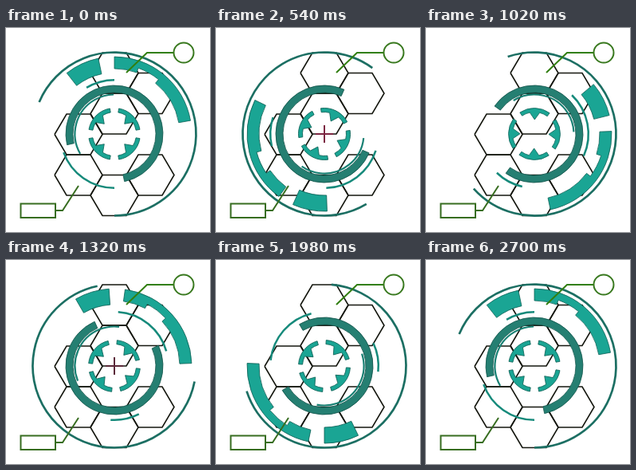
An HTML page with a canvas for the animation above (2760 ms loop, 256 px wide and 256 px high).

```html
<!DOCTYPE html>
<html lang="en">
<head>
<meta charset="utf-8">
<title>Rotating HUD</title>
<style>
  html, body { margin: 0; width: 100%; height: 100%; overflow: hidden; background: #fff; }
  canvas { display: block; width: 256px; height: 256px; }
</style>
</head>
<body>
<canvas id="stage" width="256" height="256"></canvas>
<script>
const ctx = document.getElementById('stage').getContext('2d');
const LOOP = 2760, STEP = 60;
const CX = 136, CY = 133;
const TEAL = '#1aa594', TEAL_EDGE = '#0f6257';
const STEEL = '#257f72', STEEL_EDGE = '#14564c';
const rad = deg => deg * Math.PI / 180;

function strokePath(points, color, width) {
  ctx.beginPath();
  points.forEach(([x, y]) => ctx.lineTo(x, y));
  ctx.strokeStyle = color;
  ctx.lineWidth = width;
  ctx.stroke();
}

function thinArc(r, from, to, color, width) {
  ctx.beginPath();
  ctx.arc(0, 0, r, rad(from), rad(to));
  ctx.strokeStyle = color;
  ctx.lineWidth = width;
  ctx.stroke();
}

function fillEdged(fill, edge) {
  ctx.closePath();
  ctx.fillStyle = fill;
  ctx.fill();
  ctx.strokeStyle = edge;
  ctx.lineWidth = 0.8;
  ctx.stroke();
}

function band(inner, outer, from, to, fill, edge) {
  ctx.beginPath();
  ctx.arc(0, 0, outer, rad(from), rad(to));
  ctx.arc(0, 0, inner, rad(to), rad(from), true);
  fillEdged(fill, edge);
}

function spin(deg, draw) {
  ctx.save();
  ctx.translate(CX, CY);
  ctx.rotate(rad(deg));
  draw();
  ctx.restore();
}

function drawHexagons() {
  const centers = [[136, 56.5], [181, 82], [136, 107.5], [91, 133.5], [91, 184.5], [136, 210], [181, 184.5]];
  for (const [x, y] of centers) {
    const corners = [[-30, 0], [-15, -25.5], [15, -25.5], [30, 0], [15, 25.5], [-15, 25.5], [-30, 0]];
    strokePath(corners.map(([dx, dy]) => [x + dx, y + dy]), '#15170f', 1.6);
  }
}

function drawFastRings() {
  thinArc(102.5, 203, 450, '#1c6f63', 2.7);
  band(52, 61, 167, 438, STEEL, STEEL_EDGE);
}

function drawBlocks() {
  band(77, 97, 232, 258, TEAL, TEAL_EDGE);
  // Long block with a notch cut into its inner side
  ctx.beginPath();
  ctx.arc(0, 0, 97, rad(270), rad(350));
  ctx.arc(0, 0, 82, rad(350), rad(309), true);
  ctx.arc(0, 0, 88, rad(309), rad(290), true);
  ctx.arc(0, 0, 82, rad(290), rad(270), true);
  fillEdged(TEAL, TEAL_EDGE);
  thinArc(49.5, 150, 269, '#178073', 2.2);
}

function drawSlowArcs() {
  thinArc(67.8, 239, 270, '#168a7b', 2.5);
  thinArc(67.8, 90, 160, '#168a7b', 2.5);
}

function drawReticle() {
  for (let i = 0; i < 4; i++) {
    ctx.beginPath();
    ctx.arc(0, 0, 32.5, rad(-35), rad(35));
    ctx.arc(0, 0, 27.5, rad(35), rad(13), true);
    ctx.lineTo(18, 0);
    ctx.arc(0, 0, 27.5, rad(-13), rad(-35), true);
    fillEdged(TEAL, TEAL_EDGE);
    ctx.rotate(Math.PI / 2);
  }
}

function drawCross(phase) {
  if (phase < 7 || phase > 14) return;
  const glow = Math.min(1, (phase - 6) / 4);
  const color = `rgb(${75 + 65 * glow}, ${42 - 6 * glow}, ${52 + 18 * glow})`;
  strokePath([[125, 133], [147, 133]], color, 2);
  strokePath([[136, 122], [136, 144]], color, 2);
}

function drawCallouts() {
  strokePath([[151, 56], [177, 31], [210, 31]], '#327f10', 2);
  ctx.beginPath();
  ctx.arc(223, 31, 12.5, 0, Math.PI * 2);
  ctx.strokeStyle = '#39791f';
  ctx.lineWidth = 2;
  ctx.stroke();
  ctx.strokeStyle = '#376d20';
  ctx.strokeRect(18.5, 220.5, 43.5, 17.5);
  strokePath([[62, 229], [71, 229], [91, 198]], '#376d20', 2);
}

function render() {
  const tick = Math.floor((performance.now() - start) % LOOP / STEP);
  ctx.fillStyle = '#fff';
  ctx.fillRect(0, 0, 256, 256);
  drawHexagons();
  spin(24 * tick, drawFastRings);
  spin(-16 * tick, drawBlocks);
  spin(-8 * tick, drawSlowArcs);
  spin(45 + 8 * tick, drawReticle);
  drawCross(tick % 15);
  drawCallouts();
  requestAnimationFrame(render);
}

const start = performance.now();
render();
</script>
</body>
</html>
```
